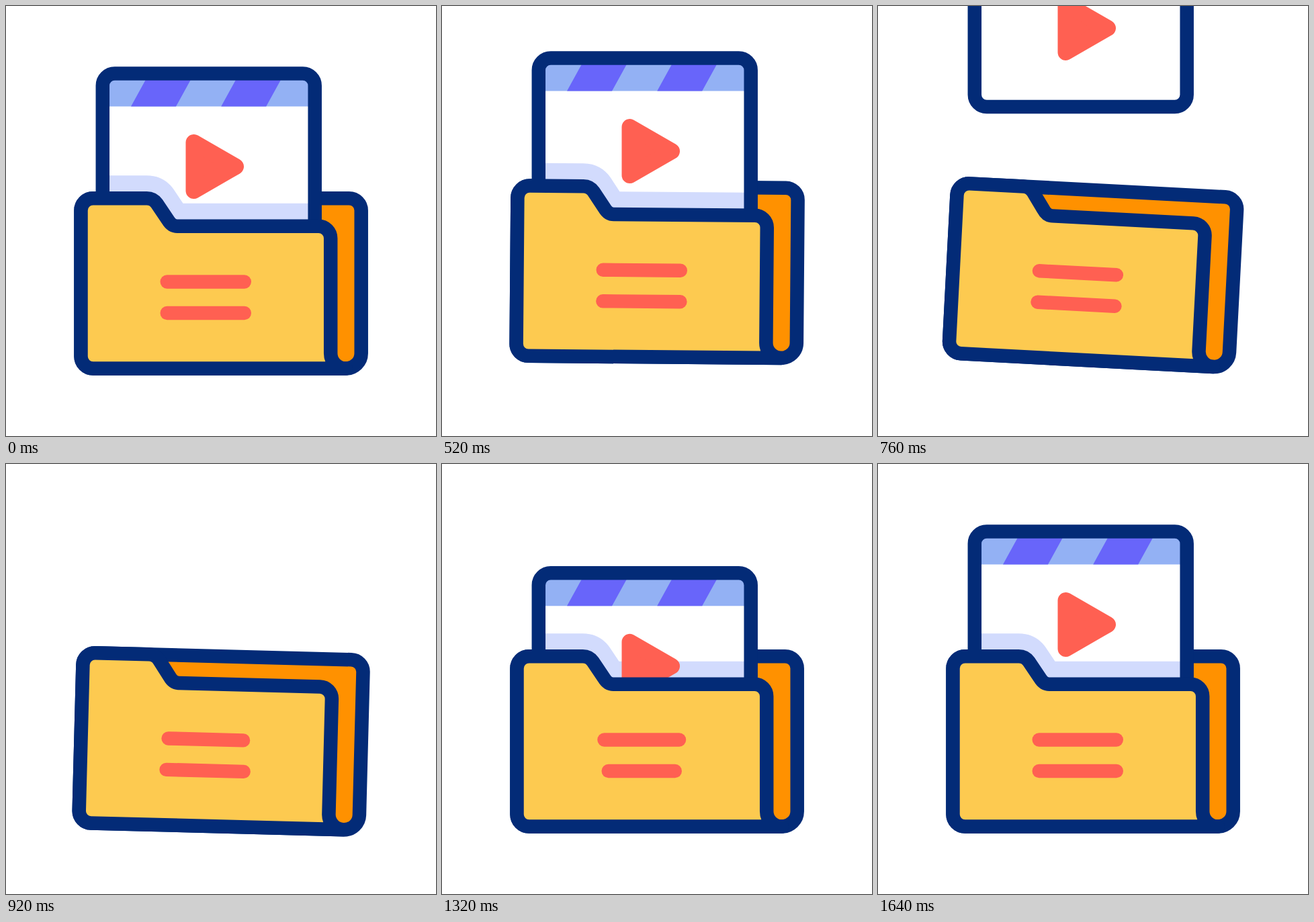
These frames come from a looping animation (640 px wide and 640 px high, 1880 ms). An HTML page:

```html
<!DOCTYPE html>
<html lang="en">
<head>
<meta charset="utf-8">
<title>Video folder</title>
<style>
  html, body { margin: 0; height: 100%; overflow: hidden; background: #fff; }
  svg { display: block; width: 100vw; height: 100vh; }

  :root {
    --t: 0;
    --navy: #032b77;
    --smooth: cubic-bezier(.333, 0, .667, 1);
  }

  .ink { stroke: var(--navy); stroke-width: 20.5; stroke-linejoin: round; }
  .coral { fill: #ff6052; }

  /* The script moves --t in 40 ms steps; the keyframes do the rest. */
  .folder, .card, .play, .bar {
    animation: 1880ms var(--smooth) calc(var(--t) * -1ms) infinite paused;
  }
  .folder { transform-origin: 320px 413px; animation-name: hop, tilt; }
  .card { animation-name: swap; }
  .play { transform-origin: 311px 239px; animation-name: pulse; }
  .bar { x: 229.5px; width: 135.5px; }
  .bar.top { animation-name: shrink-top; }
  .bar.low { animation-name: shrink-low; }

  @keyframes hop {
    0%, 21.277% { translate: 0 0; }
    34.043% { translate: 0 -34.2px; }
    44.681%, 100% { translate: 0 0; }
  }
  @keyframes tilt {
    0%, 25.532% { rotate: 0deg; }
    34.043%, 44.681% { rotate: 3deg; }
    53.191%, 100% { rotate: 0deg; }
  }
  /* Leaves through the top, then rises again from inside the folder. */
  @keyframes swap {
    0% { translate: 0 0; }
    21.277% { translate: 0 0; animation-timing-function: cubic-bezier(.333, 0, .667, .333); }
    46.808% { translate: 0 -366.5px; animation-timing-function: step-end; }
    59.574% { translate: 0 185.5px; animation-timing-function: cubic-bezier(.3, .71, .64, 1); }
    87.234%, 100% { translate: 0 0; }
  }
  @keyframes pulse {
    0% { scale: 1; }
    12.766% { scale: 1.2; }
    27.66%, 100% { scale: 1; }
  }
  @keyframes shrink-top {
    0%, 44.681% { x: 229.5px; width: 135.5px; }
    59.574% { x: 238.5px; width: 117.5px; }
    74.468%, 100% { x: 229.5px; width: 135.5px; }
  }
  @keyframes shrink-low {
    0%, 51.064% { x: 229.5px; width: 135.5px; }
    65.957% { x: 239.5px; width: 115.5px; }
    80.851%, 100% { x: 229.5px; width: 135.5px; }
  }
</style>
</head>
<body>
<svg viewBox="0 0 640 640">
  <clipPath id="sheet">
    <rect class="card" x="143.8" y="100.5" width="315.9" height="255.5" rx="18"/>
  </clipPath>

  <path class="folder ink" fill="#ff9100"
    d="M129.5 286.2H510.7a18 18 0 0 1 18 18V517a22.8 22.5 0 0 1-22.8 22.5H129.5a18 18 0 0 1-18-18V304.2a18 18 0 0 1 18-18Z"/>

  <rect class="card" x="143.8" y="100.5" width="315.9" height="255.5" rx="18" fill="#fff"/>
  <g clip-path="url(#sheet)">
    <path class="folder" fill="#d2dbfd"
      d="M120 252.3H209C228 252.3 241 260.5 250 273.5L263.5 293.7H490V365H120Z"/>
  </g>
  <g class="card">
    <path fill="#93b1f4" d="M150 105H454V149.5H150Z"/>
    <path fill="#6865fa" d="M210.5 105h67L253 149.5h-67ZM344.7 105h67L387.2 149.5h-67Z"/>
    <path class="play coral" stroke="#ff6052" stroke-width="24" stroke-linejoin="round"
      d="M279.5 203V275L342 239Z"/>
    <rect class="ink" fill="none" x="143.8" y="100.5" width="315.9" height="255.5" rx="18"/>
  </g>

  <g class="folder">
    <path class="ink" fill="#fdca50"
      d="M129.5 286.2H209.5Q219 286.2 224.5 294L241 318.5Q246.5 327.7 255 327.7H465.2a18 18 0 0 1 18 18V517a22.7 22.5 0 0 0 22.7 22.5H129.5a18 18 0 0 1-18-18V304.2a18 18 0 0 1 18-18Z"/>
    <rect class="bar top coral" y="400.3" height="20.4" rx="10.2"/>
    <rect class="bar low coral" y="446.8" height="20.4" rx="10.2"/>
  </g>
</svg>
<script>
  const LOOP = 1880, STEP = 40;
  const root = document.documentElement;
  const start = performance.now();

  function tick() {
    const t = performance.now() - start + 8;
    root.style.setProperty('--t', Math.floor(t / STEP) * STEP % LOOP);
    requestAnimationFrame(tick);
  }
  tick();
</script>
</body>
</html>
```
